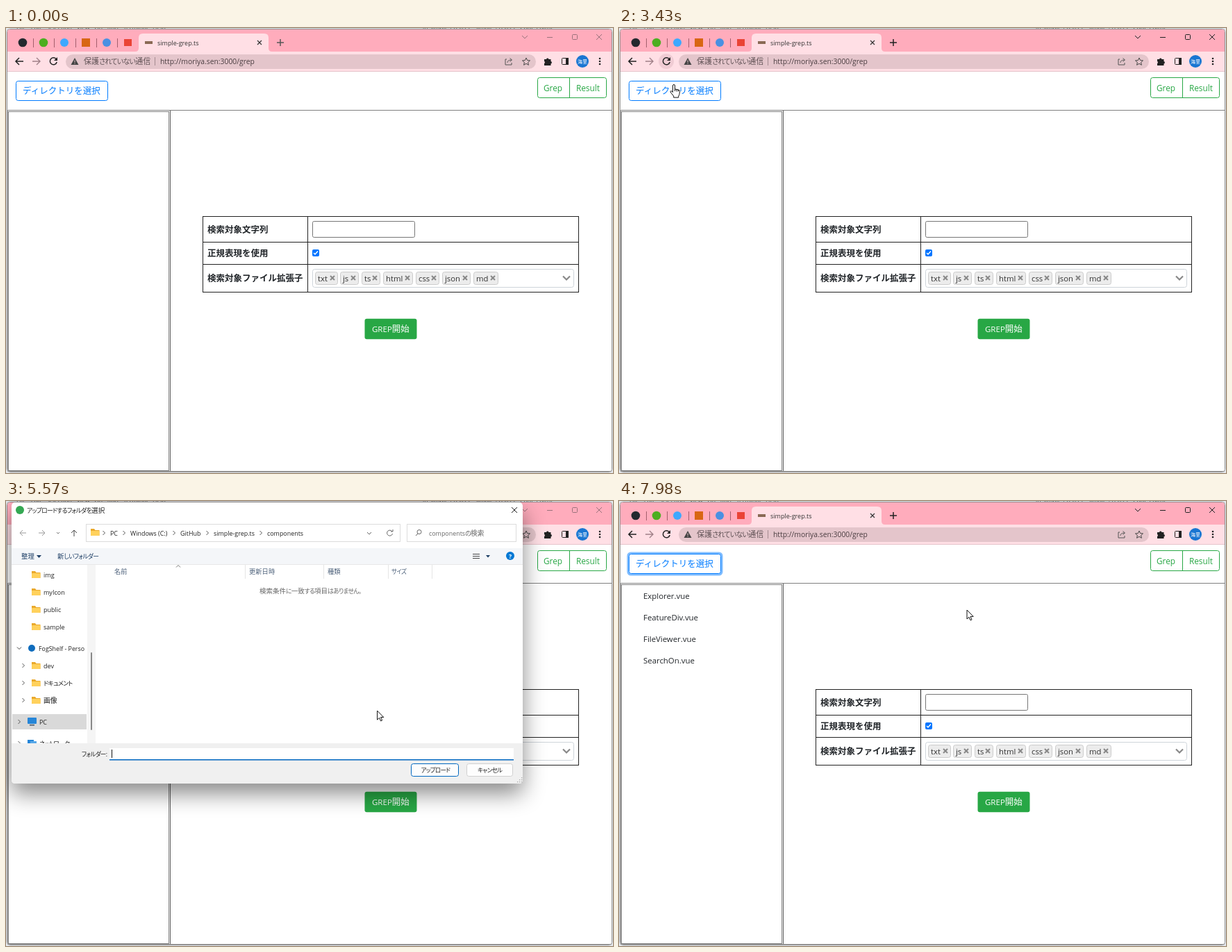
These frames come from a looping animation (874x641 px, 8000 ms). An HTML page:

```html
<!DOCTYPE html>
<html lang="ja">
<meta charset="utf-8">
<title>simple-grep.ts</title>
<style>
html,body{margin:0;width:100%;height:100%;overflow:hidden;background:#e4e7ec}
svg{display:block;width:874px;height:641px}
text{font-family:"Open Sans","Noto Sans CJK JP",sans-serif;fill:#212529;white-space:pre}
.a{font-size:.92em}
.ui .k{font-size:.92em;letter-spacing:-.08em;font-feature-settings:"palt"}
#dialog{transform-origin:376px 204px;filter:drop-shadow(0 14px 16px #0007)}
#popup{filter:drop-shadow(0 1px 2px #0007)}
</style>
<body>
<svg id="stage" viewBox="0 0 874 641"></svg>
<script>
const rect = (x, y, w, h, fill, more = '') =>
  `<rect x="${x}" y="${y}" width="${w}" height="${h}" fill="${fill}" ${more}/>`;
const box = (x, y, w, h, stroke, fill = 'none', r = 0, more = '') =>
  rect(x + .5, y + .5, w - 1, h - 1, fill, `stroke="${stroke}" rx="${r}" ${more}`);
const disc = (x, y, r, fill) => `<circle cx="${x}" cy="${y}" r="${r}" fill="${fill}"/>`;
const line = (d, stroke = '#333', w = 1, more = '') =>
  `<path d="${d}" fill="none" stroke="${stroke}" stroke-width="${w}" ${more}/>`;
const shape = (d, fill) => `<path d="${d}" fill="${fill}"/>`;
const cross = (x, y, r, c, w) => line(`M${x - r} ${y - r}l${2 * r} ${2 * r}m0 ${-2 * r}l${-2 * r} ${2 * r}`, c, w);
const group = (id, s) => `<g id="${id}">${s}</g>`;
// Latin and kana runs get their own tspan so each script keeps its proportions
const text = (x, y, s, size = 12.5, fill = '#212529', more = '') =>
  `<text x="${x}" y="${y}" font-size="${size}" style="fill:${fill}" class="${size < 12 ? 'ui' : ''}" ${more}>` +
  s.replace(/[ -~]+|[ぁ-ヿ、。「」]+/g, m => `<tspan class="${m < '\x7f' ? 'a' : 'k'}">${m}</tspan>`) + '</text>';
const bold = 'font-weight="700"';

function browser() {
  let s = rect(0, 0, 874, 641, '#e4e7ec')
    + text(15, 2, 'File   Edit   Selection   View   Go   Run   Terminal   Help', 9.5, '#555')
    + text(600, 2, 'in simple-grep.ts - simple-grep.ts - Code Editor', 9.5, '#555')
    + box(1, 1, 872, 639, '#8d8d8d', '#fff', 4)
    + shape('M2 35V6q0-4 4-4H868q4 0 4 4V35z', '#ffacbc')
    + rect(2, 34, 870, 28, '#ffdfe5') + rect(2, 62, 870, 1, '#e6c4cb')
    + shape('M186 34q5 0 5-5V14q0-6 6-6H372q6 0 6 6V29q0 5 5 5z', '#ffdfe5')
    + disc(24, 21, 6.3, '#24292f') + disc(54, 21, 6.3, '#4cae20') + disc(84, 21, 6, '#3ea8ff')
    + rect(109, 15, 12, 12, '#d86613') + disc(145, 21, 6, '#4a90e2') + rect(170, 16, 11, 10, '#ea4335')
    + [39, 69, 100, 130, 160].map(x => line(`M${x}.5 15v13`, '#a45f6d')).join('')
    + rect(200, 19, 11, 4, '#8a6a55') + text(218, 25, 'simple-grep.ts', 9.8, '#333')
    + cross(365, 21, 3, '#333', 1.2)
    + line('M390 21h10M395 16v10', '#222', 1.5, 'id="plus"')
    + `<g id="controls">` + line('M743 11l4 4 4-4M779 13.5h8', 'currentColor')
    + box(815, 9, 8, 8, 'currentColor', 'none', 1) + cross(854, 13, 4, 'currentColor', 1) + '</g>';
  // toolbar
  s += `<circle id="reload" cx="68" cy="48" r="11" fill="#f0ccd4"/>`
    + line('M25 48H14m5-5l-5 5 5 5', '#222', 1.5) + line('M38 48h11m-5-5l5 5-5 5', '#a08088', 1.4)
    + line('M72.5 45a5 5 0 1 0 .7 4', '#222', 1.5) + shape('M74 42v5h-5z', '#222')
    + rect(86, 38, 677, 21, '#e4c5cb', 'rx="10.5"')
    + shape('M99 43l5.5 10h-11z', '#444') + line('M99 46.5v3m0 1v1.2', '#e4c5cb')
    + text(112, 52, '保護されていない通信', 11, '#5f5054') + line('M214.5 42v12', '#a58b91')
    + text(222, 52, 'http://moriya.sen:3000/grep', 11.25, '#4a3d40')
    + line('M721 45h-2v8h9v-3M722 50q0-4 6-4m-2.5-2.5l3 2.5-3 2.5', '#555')
    + line('M749 43l1.6 3.5 3.9.4-2.9 2.6.8 3.8-3.4-2-3.4 2 .8-3.8-2.9-2.6 3.9-.4z', '#444')
    + shape('M775 45h3a1.8 1.8 0 0 1 3.5 0h3v3a1.8 1.8 0 0 1 0 3.5v2.5h-9.5v-3a1.7 1.7 0 0 0 0-3z', '#222')
    + box(800, 43, 10, 10, '#222', 'none', 1) + rect(806, 43, 4, 10, '#222')
    + disc(830, 48, 9, '#1976d2') + text(830, 50.6, '海里', 7, '#fff', 'text-anchor="middle"')
    + [44, 48, 52].map(y => disc(855, y, 1.3, '#222')).join('');
  return s;
}

function page() {
  let s = `<rect id="ring" x="13" y="75" width="135" height="31" rx="4" fill="none" stroke="#80bdff" stroke-width="3"/>`
    + box(14, 76, 133, 29, '#007bff', '#fff', 3) + text(24, 94.5, 'ディレクトリを選択', 12.5, '#007bff')
    + group('filled', rect(14, 76, 133, 29, '#007bff', 'rx="3"') + text(24, 94.5, 'ディレクトリを選択', 12.5, '#fff'))
    + box(765, 71, 100, 30, '#28a745', '#fff', 3) + rect(811, 71, 1, 30, '#28a745')
    + text(774, 90.5, 'Grep', 12.8, '#28a745') + text(821, 90.5, 'Result', 12.8, '#28a745')
    + rect(2, 118, 870, 1, '#808080') + box(3, 120, 232, 518, '#808080')
    + rect(2, 118, 1, 521, '#aaa') + rect(236, 119, 1, 520, '#555') + rect(2, 638, 870, 1, '#999')
    + group('files', ['Explorer', 'FeatureDiv', 'FileViewer', 'SearchOn']
      .map((n, i) => text(35, 140.5 + i * 31.2, n + '.vue', 12.4)).join(''));
  s += box(283, 271, 542, 110, '#222') + rect(283, 308, 542, 1, '#222') + rect(283, 340, 542, 1, '#222')
    + rect(434, 271, 1, 110, '#222')
    + text(290, 294.5, '検索対象文字列', 12.5, '#212529', bold) + text(290, 329, '正規表現を使用', 12.5, '#212529', bold)
    + text(290, 365, '検索対象ファイル拡張子', 12.5, '#212529', bold)
    + box(441, 278, 148, 24, '#767676', '#fff', 2)
    + rect(441, 319, 10, 10, '#0075ff', 'rx="2"') + line('M443 324l2 2 4-4.5', '#fff', 1.5)
    + box(441, 347, 377, 27, '#ced4da', '#fff', 3) + line('M802 357.5l5 5 5-5', '#888', 2.2);
  for (const [n, x, w] of [['txt', 445, 33], ['js', 481, 27], ['ts', 512, 27], ['html', 543, 43],
    ['css', 590, 34], ['json', 628, 41], ['md', 673, 36]])
    s += box(x, 351, w, 19, '#ccc', '#ececec', 3) + text(x + 4, 364.5, n, 12.3, '#333') + cross(x + w - 8, 360, 3, '#888', 2);
  return s + rect(516.5, 418.7, 75, 29.5, '#28a745', 'rx="3"') + text(527, 438, 'GREP開始', 12.5, '#fff');
}

const folder = (x, y) => shape(`M${x} ${y - 5}h5l1.5 2h6v8h-12.5z`, '#eaa92c') + rect(x, y - 2, 12.5, 7, '#ffd15c', 'rx="1"');
const chevron = (x, y) => line(`M${x - 1.5} ${y - 3}l3 3-3 3`, '#555');

function dialog() {
  let s = rect(8, 2, 736, 405, '#fff', 'rx="5"') + rect(8, 68, 736, 24, '#f4f6f9') + rect(8, 91, 736, 1, '#e8e8e8')
    + text(30, 16.5, 'アップロードするフォルダを選択', 9.6, '#222', 'id="caption"')
    + group('frame', disc(20, 13, 6, '#34a853') + cross(732, 13, 4, '#222', 1))
    + line('M29 46h-9m4-4l-4 4 4 4M47 46h9m-4-4l4 4-4 4', '#999') + line('M73 45l2 2 2-2', '#777')
    + line('M98 51v-9m-4 4l4-4 4 4', '#444')
    + box(115, 33, 453, 26, '#dcdcdc', '#fff') + folder(122, 45) + line('M520 45l3 3 3-3', '#666')
    + line('M556 44a4 4 0 1 0 .5 3M557 41v3h-3', '#666')
    + box(577, 33, 158, 26, '#dcdcdc', '#fff') + line('M590 50l3-3', '#666')
    + `<circle cx="595" cy="44.5" r="3" fill="none" stroke="#666"/>`
    + text(609, 49.5, 'componentsの検索', 9.7, '#666');
  [['PC', 150], ['Windows (C:)', 179], ['GitHub', 251], ['simple-grep.ts', 299], ['components', 376]]
    .forEach(([n, x]) => s += chevron(x - 9, 46) + text(x, 49.5, n, 9.7, '#222'));
  s += rect(70, 70, 66, 20, '#dcecfa', 'id="newHover"')
    + text(22, 83, '整理', 9.4, '#1e3f66') + shape('M44 78h7l-3.5 4z', '#1e3f66')
    + text(74, 83, '新しいフォルダー', 9.5, '#1e3f66')
    + line('M672 76.5h10M672 79.5h10M672 82.5h10', '#444') + shape('M691 78h6l-3 3.5z', '#1e3f66')
    + disc(726, 79, 6, '#0078d4') + text(726, 82.5, '?', 9.5, '#fff', 'text-anchor="middle" ' + bold);
  s += rect(117, 92, 12, 257, '#f5f5f5') + rect(122, 218, 2, 112, '#888', 'rx="1"')
    + rect(9, 94, 107, 23, '#e2f1fc', 'id="rowHover"') + rect(9, 307, 107, 22, '#d9d9d9');
  [['img', 106], ['myIcon', 131], ['public', 156], ['sample', 181], ['dev', 237], ['ドキュメント', 262], ['画像', 287]]
    .forEach(([n, y], i) => s += folder(37, y) + text(54, y + 3.5, n, 9.8, '#222') + (i > 3 ? chevron(25, y) : ''));
  s += line('M16 210.5l3 3 3-3', '#444') + disc(37, 212, 5, '#0f6cbd') + text(47, 215.5, 'FogShelf - Perso', 9.6, '#222')
    + chevron(19, 318) + rect(31, 312, 13, 9, '#2686d8', 'rx="1"') + rect(34, 322, 7, 1.5, '#456')
    + text(48, 321.5, 'PC', 9.7, '#222') + chevron(19, 349) + rect(31, 344, 9, 6, '#2686d8') + rect(35, 346, 9, 5, '#58a8e8')
    + text(48, 352.5, 'ネットワーク', 9.8, '#222');
  s += [344, 457, 550, 613].map(x => rect(x, 92, 1, 20, '#e5e5e5')).join('')
    + [['名前', 156], ['更新日時', 350], ['種類', 463], ['サイズ', 555]].map(([n, x]) => text(x, 105, n, 9.3, '#4c607a')).join('')
    + line('M245 95.5l3-3 3 3', '#777') + text(365, 132.5, '検索条件に一致する項目はありません。', 9.5, '#666')
    + shape('M8 349H744V402q0 5-5 5H13q-5 0-5-5z', '#f0f0f0')
    + text(109, 367.5, 'フォルダー:', 9.3, '#222') + rect(149, 356, 582, 16, '#fff') + rect(149, 372, 582, 1.5, '#0067c0')
    + rect(152, 358, 1, 12, '#111', 'id="caret"')
    + box(583, 378, 69, 19, '#0067c0', '#fdfdfd', 3, 'id="upload"') + text(597.5, 391, 'アップロード', 9.3, '#222')
    + box(663, 378, 67, 19, '#d0d0d0', '#fdfdfd', 3) + text(679, 391, 'キャンセル', 9.3, '#222');
  // resize grip
  for (let row = 0; row < 3; row++)
    for (let col = 0; col <= row; col++) s += rect(742 - 3 * col, 398 + 3 * row, 1.3, 1.3, '#aaa');
  return s;
}

const popup = () => rect(262, 60, 350, 118, '#fff', 'rx="3"')
  + text(274, 85.5, '4 個のファイルをこのサイトにアップロードしますか？', 11.4, '#202124')
  + text(275, 107.5, '「components」のすべてのファイルがアップロードされます。この操作は、サイトを信', 10.2, '#5f6368')
  + text(275, 122.5, '頼できる場合にのみ行ってください。', 10, '#5f6368')
  + rect(460, 140, 67, 25, '#1a73e8', 'rx="3" id="confirm"') + text(473, 156, 'アップロード', 9.5, '#fff', bold)
  + rect(533, 140, 66, 24, '#fff', 'rx="3" stroke="#1967d2" stroke-width="1.5"') + text(547, 156, 'キャンセル', 9.5, '#1967d2');

const outline = 'fill="#fff" stroke="#111" stroke-width="1" stroke-linejoin="round"';
const cursor = () => `<path id="arrow" d="M0 0V13l3-2.8 2 4.6 2-.9-2-4.5h4.2z" ${outline}/>`
  + `<path id="hand" d="M-1.5 9.5V1a1.5 1.5 0 0 1 3 0V6l4.5.8q2.5.5 2.5 2.7l-.6 4q-.3 1.6-1.2 2.6v2h-7v-2l-4-5q-1.2-1.8 0-2.4 1-.4 2.8 1.8zM1.5 6v3M4 6.5v3M6.3 7v2.5" ${outline}/>`;

stage.innerHTML = browser() + page() + group('popup', popup()) + group('dialog', dialog()) + group('cursor', cursor());

const $ = id => document.getElementById(id);
const show = (id, on) => $(id).style.display = on ? '' : 'none';
const ramp = (t, a, b) => Math.min(1, Math.max(0, (t - a) / (b - a)));
const inside = ([px, py], x, y, w, h) => px >= x && px < x + w && py >= y && py < y + h;

// time, x, y of the pointer
const route = [[770, 480, 634], [1540, 107, 114], [1610, 96, 91], [1750, 90, 87], [1960, 75, 43], [2100, 75, 43],
  [2450, 330, 26], [2870, 202, 18], [2940, 198, 21], [3360, 69, 50], [3430, 79, 82], [3710, 84, 86], [4260, 86, 84],
  [4460, 87, 85], [4560, 89, 98], [5220, 485, 355], [5500, 530, 298], [6060, 634, 391], [6730, 634, 391],
  [6800, 628, 384], [7560, 490, 151], [7630, 490, 151], [7980, 501, 157], [8000, 501, 157]];

function pointer(t) {
  const i = Math.max(1, route.findIndex(k => k[0] > t));
  const [a, ax, ay] = route[i - 1], [b, bx, by] = route[i];
  const k = ramp(t, a, b), e = k * k * (3 - 2 * k);
  return [ax + (bx - ax) * e, ay + (by - ay) * e];
}

function draw(now) {
  const t = now % 8000, p = pointer(t);
  const opening = ramp(t, 4030, 4230), closing = t < 6130 ? 0 : ramp(t, 6080, 6300);
  const visible = opening * (1 - closing), open = t > 4030 && t < 6300;
  const active = t >= 2100 && t < 4030 || t >= 6130;

  $('controls').style.color = active ? '#222' : '#9b727b';
  $('plus').style.stroke = t < 70 ? '#555' : '#222';
  show('reload', t > 3300 && t < 3500);

  $('filled').style.opacity = ramp(t, 1620, 1740) - ramp(t, 1830, 1960) + ramp(t, 3440, 3590) - ramp(t, 7650, 7800);
  show('ring', t >= 7650);
  show('files', t >= 7700);
  show('popup', t >= 6340 && t < 7650);
  $('confirm').style.fill = inside(p, 460, 140, 67, 25) ? '#2b7de9' : '#1a73e8';

  show('dialog', open);
  $('dialog').style.opacity = visible;
  $('dialog').style.transform = `scale(${1 - .07 * (1 - opening) - .047 * closing})`;
  show('frame', !closing);
  $('caption').setAttribute('x', closing ? 14 : 30);
  show('caret', (t - 4200) % 1060 < 530);
  show('newHover', inside(p, 70, 70, 66, 20));
  show('rowHover', inside(p, 9, 92, 107, 260));
  $('rowHover').setAttribute('y', 94 + 25 * Math.max(0, Math.floor((p[1] - 94) / 25)));
  $('upload').style.fill = inside(p, 583, 378, 69, 19) ? '#d3e7f8' : '#fdfdfd';

  const hand = !open && inside(p, 14, 76, 133, 29) || t >= 6790 && t < 6900;
  show('cursor', t >= 770);
  show('hand', hand);
  show('arrow', !hand);
  $('cursor').setAttribute('transform', `translate(${p})`);
  requestAnimationFrame(draw);
}
draw(performance.now());
</script>
</body>
</html>
```
